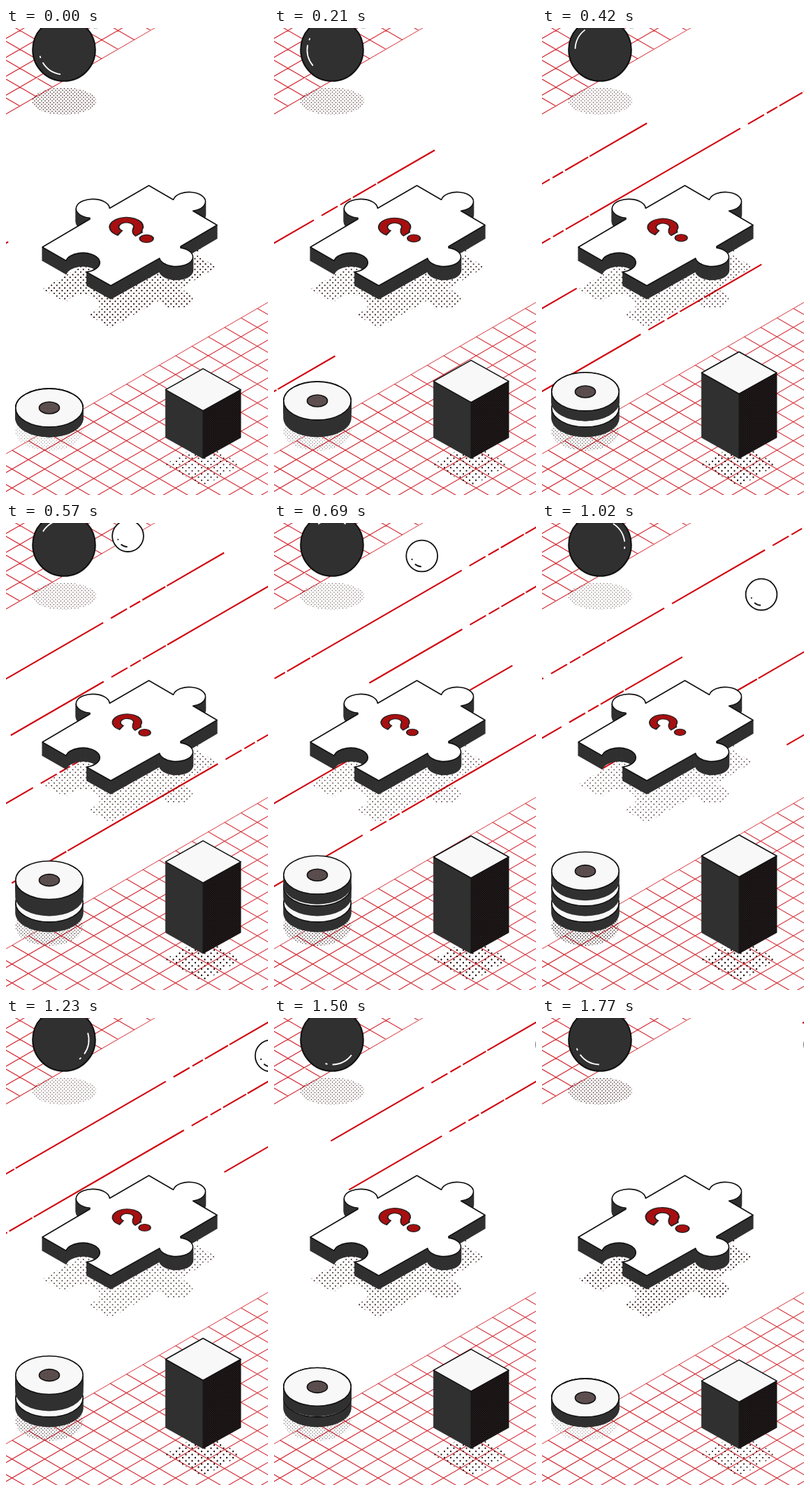
An HTML page with a canvas that plays this animation: 375 px wide and 667 px high, repeating every 1800 ms.

```html
<!DOCTYPE html>
<html lang="en">
<head>
<meta charset="utf-8">
<title>Isometric shapes</title>
<style>
html, body { margin: 0; width: 100%; height: 100%; overflow: hidden; background: #fff; }
canvas { display: block; width: 375px; height: 667px; }
</style>
</head>
<body>
<canvas id="stage"></canvas>
<script>
const W = 375, H = 667, LOOP = 1800, STEP = 30;
const SLOPE = 0.577, TAU = Math.PI * 2;
const DARK = '#303030', INK = '#111', LIGHT = '#f8f8f8', RED = '#d0060f';

const canvas = document.getElementById('stage');
const ctx = canvas.getContext('2d');
const dpr = window.devicePixelRatio || 1;
canvas.width = W * dpr;
canvas.height = H * dpr;

const rad = deg => deg * Math.PI / 180;
// triangle wave: 0 at the loop ends, 1 in the middle
const tri = t => 1 - Math.abs(((t % LOOP) + LOOP) % LOOP / (LOOP / 2) - 1);

function poly(points) {
  const p = new Path2D();
  points.forEach(([x, y]) => p.lineTo(x, y));
  p.closePath();
  return p;
}

function oval(x, y, rx, ry = rx) {
  const p = new Path2D();
  p.ellipse(x, y, rx, ry, 0, 0, TAU);
  return p;
}

function paint(path, fill, line = INK, width = 1.6) {
  ctx.fillStyle = fill;
  ctx.fill(path);
  if (!line) return;
  ctx.strokeStyle = line;
  ctx.lineWidth = width;
  ctx.stroke(path);
}

function arc(x, y, r, from, to) {
  ctx.beginPath();
  ctx.arc(x, y, r, rad(from), rad(to));
  ctx.stroke();
}

// staggered halftone inside a path; box = [x, y, w, h]
function dots(path, [x0, y0, w, h], gap, r, color) {
  ctx.save();
  ctx.clip(path);
  ctx.fillStyle = color;
  ctx.beginPath();
  for (let j = 0; j * gap / 2 <= h; j++) {
    for (let x = x0 + (j % 2) * gap / 2; x <= x0 + w; x += gap) {
      const y = y0 + j * gap / 2;
      ctx.moveTo(x + r, y);
      ctx.arc(x, y, r, 0, TAU);
    }
  }
  ctx.fill();
  ctx.restore();
}

const PITCH = 27;

// edge: height of the border line at x = 0; cross: height of one crossing line there
function grid(area, edge, dir, cross) {
  ctx.save();
  ctx.clip(area);
  ctx.strokeStyle = '#d2242d';
  ctx.lineWidth = 1.1;
  ctx.beginPath();
  for (let i = -16; i < 18; i++) {
    const up = edge + dir * Math.max(i, 0) * PITCH;
    const down = cross + i * PITCH;
    ctx.moveTo(0, up);
    ctx.lineTo(W, up - W * SLOPE);
    ctx.moveTo(0, down);
    ctx.lineTo(W, down + W * SLOPE);
  }
  ctx.stroke();
  ctx.restore();
}

const topArea = poly([[-2, -2], [217, -2], [-2, 125]]);
const lowArea = poly([[-2, 609], [W + 2, 390], [W + 2, H + 2], [-2, H + 2]]);

// dashed streaks: [height at the left edge, start time]
const SPEED = 1.08, TRAIN = 612;
const streaks = [[222.6, 281], [222.6, 858], [307.2, -3], [307.2, 834], [400.5, 374], [519, 129]];
const dashes = [[0, 133], [144, 167], [171, 186], [189, 222], [224, 306]];

function drawStreaks(t) {
  ctx.strokeStyle = RED;
  ctx.lineWidth = 2.1;
  ctx.beginPath();
  for (const [c, start] of streaks) {
    const tail = (t - start) * SPEED - TRAIN;
    for (const half of [0, TRAIN / 2]) {
      for (const [from, to] of dashes) {
        const a = Math.max(-4, tail + half + from);
        const b = Math.min(W + 4, tail + half + to);
        if (b <= a) continue;
        ctx.moveTo(a, c - a * SLOPE);
        ctx.lineTo(b, c - b * SLOPE);
      }
    }
  }
  ctx.stroke();
}

function jigsaw() {
  const p = new Path2D();
  p.moveTo(204.5, 225);
  p.lineTo(239, 245);
  p.ellipse(262.3, 248, 23.2, 13.6, 0, 3.35, 1.34 + TAU);
  p.lineTo(302, 281.5);
  p.lineTo(250, 312);
  p.ellipse(243.5, 327, 24, 13.6, 0, -1.3, 3);
  p.lineTo(150, 368);
  p.lineTo(116, 349);
  p.ellipse(110, 335, 24.3, 13.8, 0, 1.33, -2.95, true);
  p.lineTo(52, 313);
  p.lineTo(120, 273);
  p.ellipse(124.3, 258, 24, 13.6, 0, 1.75, 6.25);
  p.closePath();
  return p;
}
const piece = jigsaw();
const pieceShadow = new Path2D();
pieceShadow.addPath(piece, new DOMMatrix().translate(0, 60));

function drawPiece(t) {
  for (let d = 19; d > 0; d--) {
    ctx.save();
    ctx.translate(0, d);
    paint(piece, DARK, DARK, 1.4);
    ctx.restore();
  }
  paint(piece, '#fff');
  drawMark(1 - 0.2 * tri(t));
}

function hook(extra, width, color) {
  ctx.beginPath();
  ctx.arc(0, -9.5, 14.2, rad(168) - extra / 14, rad(405));
  ctx.quadraticCurveTo(0, 6, 0, 11 + extra);
  ctx.lineWidth = width;
  ctx.strokeStyle = color;
  ctx.stroke();
}

function drawMark(scale) {
  ctx.save();
  ctx.translate(180.5, 289);
  ctx.scale(scale, scale);
  ctx.transform(0.866, -0.5, 0.866, 0.5, 0, 0);
  hook(1, 12.4, '#262020');
  hook(-1, 9, '#a80f10');
  paint(oval(0, 23.8, 7.9), '#a80f10', '#262020', 1.7);
  ctx.restore();
}

function drawBall(t) {
  paint(oval(83, 31, 44.8), DARK, INK, 2);
  ctx.strokeStyle = '#fff';
  ctx.lineWidth = 1.8;
  const a = 163 + t * 0.2;
  arc(83, 31, 35.5, a - 65, a - 14);
  arc(83, 31, 35.5, a - 2.5, a + 2.5);
}

function drawBubble(t) {
  const u = Math.min(Math.max(t - 420, 0), 870);
  const x = 128 + u * 0.31;
  const y = u < 620
    ? -23 + 0.259 * u - 0.000153 * u * (u - 270)
    : 104.4 - (u - 620) * 0.2656;
  paint(oval(x, y, 22.4), '#fff', INK, 1.8);
  arc(x, y, 15.5, 93, 130);
  arc(x, y, 15, 157, 164);
}

function drawDisc(y) {
  const x = 62, rx = 48.2, ry = 27.4, h = 14;
  const side = new Path2D();
  side.ellipse(x, y + h, rx + 0.6, ry + 0.6, 0, 0, Math.PI);
  side.lineTo(x - rx - 0.6, y);
  side.lineTo(x + rx + 0.6, y);
  side.closePath();
  paint(side, DARK, null);
  paint(oval(x, y, rx, ry), LIGHT);
  const hole = oval(x, y, 14.5, 8.5);
  paint(hole, '#675858', null);
  dots(hole, [x - 15, y - 9, 30, 18], 2.5, 0.6, '#453a3a');
  paint(hole, 'transparent');
}

function drawStack(t) {
  const rise = Math.max(0, 55.8 * tri(t) - 3);
  drawDisc(542.5);
  drawDisc(542.5 - Math.min(rise, 23));
  drawDisc(542.5 - rise);
}

function drawCube(t) {
  const y = 488.5 - 51.75 * tri(t + 32);
  const l = 228.4, m = 282, r = 336;
  const right = poly([[m, y + 60], [r, y + 30], [r, 585], [m, 615]]);
  paint(poly([[l, y + 30], [m, y + 60], [m, 615], [l, 585]]), DARK, DARK, 0.8);
  paint(right, '#151112', INK, 0.8);
  dots(right, [m, 430, 56, 190], 3, 0.6, '#332626');
  paint(poly([[m, y], [r, y + 30], [m, y + 60], [l, y + 30]]), LIGHT);
}

const ballShadow = oval(83, 104.5, 46, 19.5);
const discShadow = oval(62, 576, 48.5, 28);
const cubeShadow = poly([[282, 592], [337, 623.5], [282, 655], [227, 623.5]]);

function drawShadows(t) {
  const k = tri(t);
  dots(ballShadow, [36, 84, 95, 42], 5, 0.85 - 0.15 * k, `rgba(50,18,20,${0.9 - 0.3 * k})`);
  dots(pieceShadow, [50, 284, 256, 148], 7.6, 1.1 - 0.2 * k, `rgba(45,16,18,${1 - 0.3 * k})`);
  dots(discShadow, [12, 548, 100, 58], 4.8, 0.6 + 0.3 * k, `rgba(40,20,22,${0.6 + 0.35 * k})`);
  dots(cubeShadow, [226, 592, 112, 64], 9, 1.1 + 0.15 * k, '#2a1517');
}

function draw(t) {
  ctx.setTransform(dpr, 0, 0, dpr, 0, 0);
  ctx.lineJoin = 'round';
  ctx.fillStyle = '#fff';
  ctx.fillRect(0, 0, W, H);
  grid(topArea, 123, -1, 19);
  grid(lowArea, 608, 1, 220);
  drawStreaks(t);
  drawShadows(t);
  drawBall(t);
  drawBubble(t);
  drawPiece(t);
  drawStack(t);
  drawCube(t);
}

const begin = performance.now();
function tick() {
  const t = (performance.now() - begin) % LOOP;
  draw(Math.floor(t / STEP) * STEP);
  requestAnimationFrame(tick);
}
tick();
</script>
</body>
</html>
```
